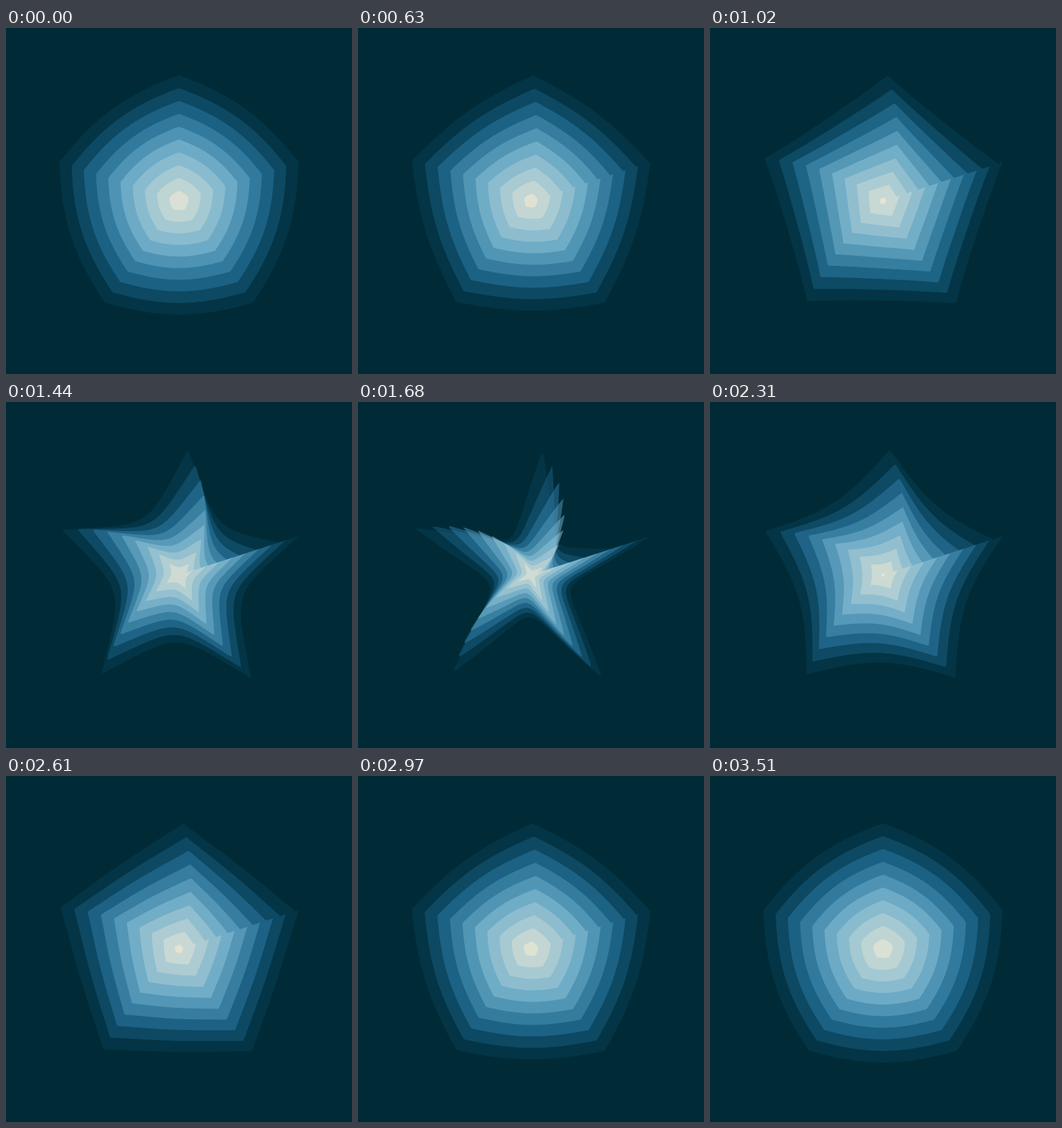
Animation, 512 px wide and 512 px high, one loop 3540 ms. Source, as an HTML page with a canvas:

```html
<!DOCTYPE html>
<html>
<head>
<meta charset="utf-8">
<style>
  html, body { margin: 0; width: 100%; height: 100%; overflow: hidden; background: #002b36; }
  canvas { display: block; }
</style>
</head>
<body>
<canvas width="512" height="512"></canvas>
<script>
const ctx = document.querySelector('canvas').getContext('2d');
const LOOP = 3540, STEP = 30, LAYERS = 10, SAMPLES = 360;
const OUTER = 186, INNER = 15, START = -Math.PI / 10;
const STOPS = [
  { at: 0, rgb: [6, 65, 86] },
  { at: 0.2, rgb: [42, 122, 164] },
  { at: 0.5, rgb: [136, 193, 218] },
  { at: 0.95, rgb: [253, 239, 212] }
];

// Translucent fill for a depth from 0 at the rim to 1 at the centre.
function depthColor(depth) {
  const d = Math.min(depth, 0.95);
  const k = STOPS.findIndex(stop => d <= stop.at) || 1;
  const from = STOPS[k - 1], to = STOPS[k];
  const u = (d - from.at) / (to.at - from.at);
  const mix = from.rgb.map((c, j) => c + (to.rgb[j] - c) * u);
  return `rgba(${mix.map(Math.round)}, 0.5)`;
}

// Superformula with both inner exponents equal to 1.
function supershape(radius, m, n) {
  ctx.beginPath();
  for (let s = 0; s <= SAMPLES; s++) {
    const a = s / SAMPLES * 2 * Math.PI;
    const p = m * a / 4;
    const r = radius * (Math.abs(Math.cos(p)) + Math.abs(Math.sin(p))) ** (-1 / n);
    ctx.lineTo(256 + r * Math.cos(a + START), 256 + r * Math.sin(a + START));
  }
  ctx.fill();
}

function draw(ms) {
  const wave = Math.abs(Math.cos(Math.PI * ms / LOOP));
  const swell = wave * wave;
  const n = 0.3 + 3.1 * swell;
  const gap = (OUTER - INNER * swell) / (LAYERS - 1);
  ctx.fillStyle = '#002b36';
  ctx.fillRect(0, 0, 512, 512);
  for (let i = 0; i < LAYERS; i++) {
    const radius = Math.max(OUTER - gap * i, 0);
    ctx.fillStyle = depthColor(1 - radius / OUTER);
    supershape(radius, 5 - (i + 1) / LAYERS * (1 - wave), n);
  }
}

function tick() {
  draw(Math.floor(performance.now() % LOOP / STEP) * STEP);
  requestAnimationFrame(tick);
}
tick();
</script>
</body>
</html>
```
